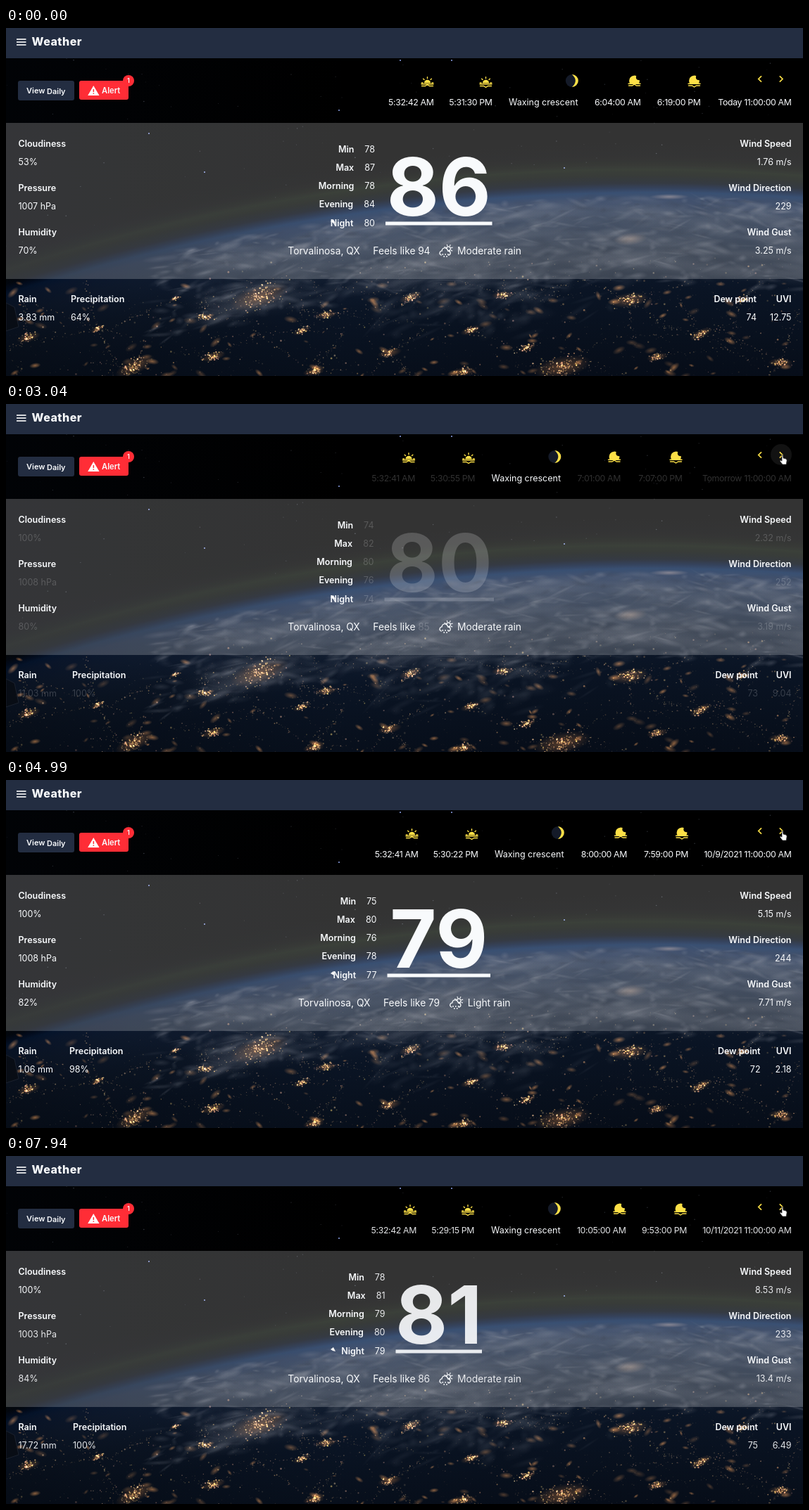
An HTML page with a canvas that plays this animation: 1132x495 px, repeating every 7.99 s.

```html
<!DOCTYPE html>
<html lang="en">
<head>
<meta charset="utf-8">
<title>Weather</title>
<style>
html, body { margin: 0; width: 100%; height: 100%; overflow: hidden; background: #000; }
canvas { display: block; width: 1132px; height: 495px; }
</style>
</head>
<body>
<canvas id="stage" width="1132" height="495"></canvas>
<script>
const W = 1132, H = 495, LOOP = 7990, FADE = 285;
const NAVY = '#232d41', RED = '#ff2d36', YELLOW = '#fde047', WHITE = '#f8fafc';
const ctx = document.getElementById('stage').getContext('2d');

// ends: right edges of the header columns; bar: underline of the big number
const days = [
  { times: ['5:32:42 AM', '5:31:30 PM', 'Waxing crescent', '6:04:00 AM', '6:19:00 PM', 'Today 11:00:00 AM'],
    ends: [607.5, 690.5, 812.5, 901.5, 986.5], left: ['53%', '1007 hPa', '70%'], right: ['1.76 m/s', '229', '3.25 m/s'],
    temps: ['78', '87', '78', '84', '80'], now: '86', bar: [539, 690.5], feels: '94', sky: 'Moderate rain',
    rain: '3.83 mm', chance: '64%', chanceX: 92, dew: '74', dewX: 1066, uvi: '12.75' },
  { times: ['5:32:41 AM', '5:30:55 PM', 'Waxing crescent', '7:01:00 AM', '7:07:00 PM', 'Tomorrow 11:00:00 AM'],
    ends: [581, 666, 788, 873, 960.5], left: ['100%', '1008 hPa', '80%'], right: ['2.32 m/s', '252', '3.19 m/s'],
    temps: ['74', '82', '80', '76', '74'], now: '80', bar: [537.5, 693], feels: '85', sky: 'Moderate rain',
    rain: '11.03 mm', chance: '100%', chanceX: 94, dew: '73', dewX: 1068, uvi: '9.04' },
  { times: ['5:32:41 AM', '5:30:22 PM', 'Waxing crescent', '8:00:00 AM', '7:59:00 PM', '10/9/2021 11:00:00 AM'],
    ends: [585.5, 670.5, 792.5, 882, 969], left: ['100%', '1008 hPa', '82%'], right: ['5.15 m/s', '244', '7.71 m/s'],
    temps: ['75', '80', '76', '78', '77'], now: '79', bar: [541.5, 688], feels: '79', sky: 'Light rain',
    rain: '1.06 mm', chance: '98%', chanceX: 90, dew: '72', dewX: 1071.5, uvi: '2.18' },
  { times: ['5:32:41 AM', '5:29:48 PM', 'Waxing crescent', '9:02:00 AM', '8:54:00 PM', '10/10/2021 11:00:00 AM'],
    ends: [578.5, 665, 787.5, 875.5, 964], left: ['100%', '1006 hPa', '90%'], right: ['7.94 m/s', '230', '12.31 m/s'],
    temps: ['77', '79', '78', '79', '79'], now: '77', bar: [542, 687], feels: '79', sky: 'Light rain',
    rain: '3.12 mm', chance: '96%', chanceX: 88.5, dew: '74', dewX: 1068, uvi: '5.04' },
  { times: ['5:32:42 AM', '5:29:15 PM', 'Waxing crescent', '10:05:00 AM', '9:53:00 PM', '10/11/2021 11:00:00 AM'],
    ends: [583, 665, 787.5, 880.5, 967], left: ['100%', '1003 hPa', '84%'], right: ['8.53 m/s', '233', '13.4 m/s'],
    temps: ['78', '81', '79', '80', '79'], now: '81', bar: [553.5, 676], feels: '86', sky: 'Moderate rain',
    rain: '17.72 mm', chance: '100%', chanceX: 95, dew: '75', dewX: 1068, uvi: '6.49' }
];
const clicks = [
  { press: 2700, swap: 2985, calm: 3380 },
  { press: 4310, swap: 4705, calm: 4990 },
  { press: 5870, swap: 6175, calm: 6470 },
  { press: 7440, swap: 7680, calm: 7540 }
];

const clamp = v => Math.max(0, Math.min(1, v));
const mix = (a, b, c, u) => a * (1 - u) ** 2 + 2 * b * u * (1 - u) + c * u * u;

let seed = 7;
const rnd = () => (seed = (seed * 16807) % 2147483647) / 2147483647;
const spread = () => rnd() + rnd() + rnd() - 1.5;

function text(s, x, y, { size = 12.5, weight = 400, align = 'left', gap = 0, color = WHITE, alpha = 1 } = {}) {
  ctx.font = `${weight} ${size}px Inter, "Open Sans", sans-serif`;
  ctx.letterSpacing = gap + 'px';
  ctx.textAlign = align;
  ctx.fillStyle = color;
  ctx.globalAlpha = alpha;
  ctx.fillText(s, x, y);
  ctx.globalAlpha = 1;
  return ctx.measureText(s).width;
}

function shape(points, fill, stroke, width = 1, c = ctx) {
  c.beginPath();
  points.forEach(([x, y]) => c.lineTo(x, y));
  if (fill) { c.closePath(); c.fillStyle = fill; c.fill(); }
  if (stroke) { c.strokeStyle = stroke; c.lineWidth = width; c.stroke(); }
}

function disc(x, y, r, fill, c = ctx) {
  c.beginPath();
  c.arc(x, y, r, 0, Math.PI * 2);
  c.fillStyle = fill;
  c.fill();
}

function box(x, y, w, h, r, fill) {
  ctx.beginPath();
  ctx.roundRect(x, y, w, h, r);
  ctx.fillStyle = fill;
  ctx.fill();
}

// ---- night-time planet ----
const limbY = x => 3242 - Math.sqrt(3011 ** 2 - (x - 920) ** 2);

function ring(c, cx, cy, from, to, stops) {
  const g = c.createRadialGradient(cx, cy, from, cx, cy, to);
  stops.forEach(([r, color]) => g.addColorStop((r - from) / (to - from), color));
  c.fillStyle = g;
  c.fillRect(0, 0, W, H);
}

function blob(c, x, y, rx, ry, tilt, rgb, alpha) {
  c.save();
  c.translate(x, y);
  c.rotate(tilt);
  c.scale(rx, ry);
  const g = c.createRadialGradient(0, 0, 0, 0, 0, 1);
  g.addColorStop(0, `rgba(${rgb},${alpha})`);
  g.addColorStop(1, `rgba(${rgb},0)`);
  disc(0, 0, 1, g, c);
  c.restore();
}

function drawClouds(c) {
  const tilt = x => (x - 920) / 3011;
  for (let i = 0; i < 200; i++) {
    const x = 300 + rnd() * 900, depth = 22 + rnd() * 95;
    blob(c, x, limbY(x) + depth, 30 + rnd() * 60, 6 + rnd() * 13, tilt(x), '118,122,134', 0.05 + rnd() * 0.07);
  }
  // fine mottling, light and dark
  for (let i = 0; i < 1100; i++) {
    const x = 210 + rnd() * 950, depth = 10 + rnd() ** 1.2 * 125;
    const tone = rnd() < 0.6 ? '150,153,163' : '10,18,34';
    blob(c, x, limbY(x) + depth, 4 + rnd() * 24, 1.5 + rnd() * 5, tilt(x) + spread() * 0.5, tone, 0.06 + rnd() * 0.16);
  }
  for (let i = 0; i < 190; i++) {
    blob(c, 650 + spread() * 190, 380 + spread() * 50, 5 + rnd() * 28, 2 + rnd() * 9, -0.4 + spread() * 0.5, '112,118,130', 0.1);
  }
}

function drawLights(c) {
  const cities = [
    [360, 382, 20], [885, 387, 13], [790, 482, 19], [183, 481, 14], [575, 383, 8], [705, 380, 7],
    [455, 408, 7], [295, 467, 8], [545, 462, 8], [420, 431, 6], [660, 430, 7], [740, 455, 6],
    [987, 435, 8], [1045, 386, 6], [32, 440, 8], [282, 411, 6], [130, 428, 5], [650, 489, 8],
    [437, 489, 7], [1100, 476, 8], [925, 468, 7], [240, 385, 4]
  ];
  const light = (x, y, r, a) => disc(x, y, r, `rgba(255,${165 + rnd() * 50 | 0},${85 + rnd() * 60 | 0},${a})`, c);
  c.globalCompositeOperation = 'lighter';
  blob(c, 942, 240, 28, 4, 0, '255,185,120', 0.35);
  blob(c, 887, 300, 24, 9, -0.1, '255,185,120', 0.3);
  cities.forEach(([x, y, s]) => {
    const lean = -0.25 + spread() * 0.3;
    blob(c, x, y, s * 2.2, s * 0.8, lean, '255,150,60', 0.32);
    for (let i = 0; i < s * 6; i++) {
      const d = spread() * s * (0.6 + rnd() * 2), e = spread() * s * 0.8;
      const r = 0.4 + rnd() * 0.8;
      light(x + d, y + d * lean + e, r, 0.2 + rnd() * 0.55);
    }
  });
  // faint towns strung along roads between the cities
  for (let i = 0; i < 75; i++) {
    const [ax, ay] = cities[rnd() * cities.length | 0], reach = 40 + rnd() * 110, turn = rnd() * 6.28;
    for (let d = 0; d < reach; d += 2 + rnd() * 5) {
      const x = ax + Math.cos(turn) * d + spread() * 4, y = ay + Math.sin(turn) * d * 0.5 + spread() * 3;
      if (y > 358) light(x, y, 0.3 + rnd() * 0.6, 0.08 + rnd() * 0.36);
    }
  }
  for (let i = 0; i < 130; i++) {
    const x = rnd() * W, y = 362 + rnd() * 133, s = 2 + rnd() * 5;
    blob(c, x, y, s * 1.5, s * 0.7, spread(), '255,160,75', 0.2 + rnd() * 0.35);
  }
  for (let i = 0; i < 1100; i++) {
    const x = rnd() * W, y = 325 + rnd() * 170;
    if (y > limbY(x) + 45) light(x, y, 0.3 + rnd() ** 4 * 1.1, 0.1 + rnd() * 0.35);
  }
  c.globalCompositeOperation = 'source-over';
}

function makePlanet() {
  const layer = document.createElement('canvas');
  layer.width = W;
  layer.height = H;
  const c = layer.getContext('2d');
  ring(c, 920, 3242, 2700, 3080, [
    [2700, '#050a14'], [2800, '#08101d'], [2870, '#0a1424'], [2925, '#0f1b2e'], [2975, '#152540'],
    [2999, '#12264a'], [3008, '#08244f'], [3014, '#031434'], [3021, '#020916'], [3036, '#020304'], [3080, '#000000']
  ]);
  ring(c, 900, 3103, 2880, 2922, [
    [2880, 'rgba(10,17,8,0)'], [2891, 'rgba(10,17,8,.4)'], [2902, 'rgba(11,18,9,.9)'],
    [2909, 'rgba(9,13,6,.5)'], [2922, 'rgba(6,8,5,0)']
  ]);
  const shade = c.createLinearGradient(0, 0, 480, 0);
  shade.addColorStop(0, 'rgba(2,5,10,.6)');
  shade.addColorStop(1, 'rgba(2,5,10,0)');
  c.fillStyle = shade;
  c.fillRect(0, 0, W, H);

  for (let i = 0; i < 150; i++) {
    const x = rnd() * W, y = 43 + rnd() * 290;
    if (y < limbY(x) - 35) disc(x, y, 0.4 + rnd() * 0.4, `rgba(180,190,215,${0.1 + rnd() * 0.3})`, c);
  }
  [[560, 46], [633, 46], [473, 117], [203, 150], [282, 205], [793, 199]]
    .forEach(([x, y]) => disc(x, y, 1, '#8fa5ee', c));

  drawClouds(c);
  drawLights(c);
  shape([[0, 391], [12, 397], [18, 425], [0, 431]], 'rgba(9,12,19,.8)', '#1b212d', 1, c);
  c.fillStyle = 'rgba(255,255,255,.2)';
  c.fillRect(0, 135, W, 222);
  shape([[461, 275], [465, 272], [468, 278], [464, 277]], '#f4f4f4', null, 1, c);
  return layer;
}
const planet = makePlanet();

// ---- icons ----
function horizon(x, y, dir) {
  shape([[x - 8.5, y + 4.3], [x + 8.5, y + 4.3]], null, YELLOW, 1.4);
  shape([[x - 8, y + 7], [x - 3, y + 7], [x, y + 7 - dir * 2], [x + 3, y + 7], [x + 8, y + 7]], null, YELLOW, 1.4);
}

function sunIcon(x, y, dir) {
  ctx.lineCap = 'round';
  ctx.beginPath();
  ctx.arc(x, y + 3, 4.7, Math.PI, 0);
  ctx.fillStyle = YELLOW;
  ctx.fill();
  for (let i = 0; i < 5; i++) {
    const a = Math.PI * (1 + i / 4), cx = Math.cos(a), sy = Math.sin(a);
    shape([[x + cx * 6.3, y + 2.5 + sy * 6.3], [x + cx * 8.3, y + 2.5 + sy * 8.3]], null, YELLOW, 1.4);
  }
  horizon(x, y, dir);
}

function moonIcon(x, y, dir) {
  ctx.save();
  ctx.beginPath();
  ctx.rect(x - 10, y - 10, 20, 14);
  ctx.clip();
  ctx.beginPath();
  ctx.arc(x, y, 7.4, -0.1, Math.PI * 1.62);
  ctx.quadraticCurveTo(x + 1, y - 1, x + 7.3, y - 0.7);
  ctx.fillStyle = YELLOW;
  ctx.fill();
  ctx.restore();
  horizon(x, y, dir);
}

function crescentIcon(x, y) {
  disc(x, y, 9, '#141a28');
  ctx.beginPath();
  ctx.arc(x, y, 9, -Math.PI / 2, Math.PI / 2);
  ctx.quadraticCurveTo(x + 10, y, x, y - 9);
  ctx.fillStyle = YELLOW;
  ctx.fill();
}

function rainIcon(x, y) {
  ctx.strokeStyle = WHITE;
  ctx.lineWidth = 1.3;
  ctx.beginPath();
  ctx.arc(x - 5, y + 3, 3.2, Math.PI * 0.6, Math.PI * 1.5);
  ctx.arc(x - 1, y, 4.2, Math.PI * 1.05, Math.PI * 1.95);
  ctx.arc(x + 4, y + 3.2, 2.9, Math.PI * 1.45, Math.PI * 0.5);
  ctx.stroke();
  ctx.beginPath();
  ctx.arc(x + 4, y - 3, 3, Math.PI * 1.05, Math.PI * 0.45);
  ctx.stroke();
  for (let i = 0; i < 5; i++) {
    const a = -2.7 + i * 0.8, cx = Math.cos(a), sy = Math.sin(a);
    shape([[x + 4 + cx * 4.6, y - 3 + sy * 4.6], [x + 4 + cx * 6, y - 3 + sy * 6]], null, WHITE, 1.2);
  }
  for (let i = 0; i < 5; i++) disc(x - 4 + i * 1.9, y + (i % 2 ? 8 : 5), 0.9, WHITE);
}

// ---- pointer ----
function arrow(x, y) {
  const p = [[0, 0], [0, 10.5], [2.4, 8.4], [4, 12], [5.8, 11.2], [4.2, 7.7], [7.3, 7.5]];
  shape(p.map(([a, b]) => [x + a, y + b]), '#fff', '#222', 0.6);
}

function hand(x, y) {
  const p = [[0, 0.6], [1.6, 0.6], [2, 5], [6, 6], [7.2, 8], [6.2, 14], [1, 14], [-2.8, 9.2], [-2, 7.8], [0, 9.2]];
  ctx.lineJoin = 'round';
  shape(p.map(([a, b]) => [x + a, y + b]), '#fff', '#222', 0.7);
}

function pointer(t) {
  if (t < 520) return;
  if (t < 1530) {
    const u = 1 - (1 - clamp((t - 500) / 700)) ** 3;
    return arrow(mix(952, 1230, 1072, u), mix(495, 380, 209, u));
  }
  const u = 1 - (1 - clamp((t - 1530) / 690)) ** 4;
  const x = mix(1072, 1097, 1102, u), y = mix(209, 140.5, 72, u);
  (y < 88 ? hand : arrow)(x, y);
}

// ---- page ----
function frame() {
  ctx.fillStyle = NAVY;
  ctx.fillRect(0, 0, W, 43);
  ctx.lineCap = 'butt';
  [16, 20, 24].forEach(y => shape([[15, y], [28.5, y]], null, '#fff', 1.6));
  text('Weather', 36.5, 24.5, { size: 16, weight: 800, gap: 0.5 });

  box(17, 75, 80, 28, 3, NAVY);
  text('View', 29, 93, { size: 11, weight: 600 });
  text('Daily', 58, 94, { size: 11, weight: 600 });
  box(104, 75, 70, 27, 3, RED);
  shape([[124.3, 82], [132.5, 96], [116.2, 96]], '#fff');
  ctx.fillStyle = RED;
  ctx.fillRect(123.6, 87, 1.5, 4);
  ctx.fillRect(123.6, 92.4, 1.5, 1.5);
  text('Alert', 136, 93, { size: 11.2, weight: 600 });
  disc(174, 75, 8, RED);
  text('1', 174, 78.3, { size: 9, weight: 600, align: 'center' });
}

function nav(t) {
  clicks.forEach(({ press, calm }) => {
    if (t < press || t >= calm) return;
    const glow = 0.07 * clamp((t - press - 20) / 60) * clamp((calm - t) / 100);
    disc(1101, 72, 15, `rgba(255,255,255,${glow})`);
  });
  ctx.lineCap = 'butt';
  ctx.lineJoin = 'miter';
  shape([[1073, 68.4], [1068.8, 72.5], [1073, 76.6]], null, YELLOW, 1.7);
  shape([[1098.8, 68.4], [1103, 72.5], [1098.8, 76.6]], null, YELLOW, 1.7);
  if (clicks.some(({ press }) => t >= press && t < press + 90)) disc(1101.8, 73, 9, 'rgba(255,240,0,.44)');
}

function report(t) {
  const n = clicks.filter(c => t >= c.swap).length;
  const day = days[n], last = days[n - 1];
  const fade = n ? clamp((t - clicks[n - 1].swap) / FADE) : 1;
  // only values that differ from the previous day fade in
  const shown = (now, old) => (last && now !== old ? fade : 1);
  const was = (key, i) => last && (i === undefined ? last[key] : last[key][i]);
  const label = (s, x, y, align) => text(s, x, y, { weight: 600, align });
  const value = (s, old, x, y, align) => text(s, x, y, { align, alpha: shown(s, old) });

  day.times.forEach((s, i) => {
    const end = day.ends[i] || 1115.5, word = i === 2;
    text(s, end, 110, { size: word ? 12.5 : 12.3, gap: word ? 0 : -0.35, align: 'right', alpha: shown(s, was('times', i)) });
    if (i < 2) sunIcon(end - 9, 75.5, i ? -1 : 1);
    else if (word) crescentIcon(end - 8.7, 75);
    else if (i < 5) moonIcon(end - 9, 75, i === 3 ? 1 : -1);
  });

  ['Cloudiness', 'Pressure', 'Humidity'].forEach((s, i) => {
    label(s, 17.5, 169 + i * 63, 'left');
    value(day.left[i], was('left', i), 17.5, 195.3 + i * 63, 'left');
  });
  ['Wind Speed', 'Wind Direction', 'Wind Gust'].forEach((s, i) => {
    label(s, 1115.5, 169 + i * 63, 'right');
    value(day.right[i], was('right', i), 1115.5, 195.3 + i * 63, 'right');
  });

  const [from, to] = day.bar;
  ['Min', 'Max', 'Morning', 'Evening', 'Night'].forEach((s, i) => {
    const y = 176.5 + i * 26.25;
    const w = value(day.temps[i], was('temps', i), from - 15, y, 'right');
    label(s, from - 30 - w, y, 'right');
  });
  const alpha = shown(day.now, was('now'));
  text(day.now, (from + to) / 2, 267, { size: 114, weight: 700, align: 'center', alpha });
  ctx.globalAlpha = alpha;
  ctx.fillRect(from, 275.5, to - from, 5);
  ctx.globalAlpha = 1;

  const x = day.sky === 'Light rain' ? 415 : 400.3, y = 321.7, size = 13.8;
  text('Torvalinosa, QX', x, y, { size });
  const w = text('Feels like ', x + 121, y, { size });
  text(day.feels, x + 121 + w, y, { size, gap: -0.3, alpha: shown(day.feels, was('feels')) });
  rainIcon(x + 224, 317);
  text(day.sky, x + 240.8, y, { size, alpha: shown(day.sky, was('sky')) });

  label('Rain', 17.5, 390, 'left');
  value(day.rain, was('rain'), 17.5, 416.3, 'left');
  label('Precipitation', day.chanceX, 390, 'left');
  value(day.chance, was('chance'), day.chanceX, 416.3, 'left');
  label('Dew point', day.dewX, 390, 'right');
  value(day.dew, was('dew'), day.dewX, 416.3, 'right');
  label('UVI', 1115.5, 390, 'right');
  value(day.uvi, was('uvi'), 1115.5, 416.3, 'right');
}

let start;
function tick(now) {
  start ??= now;
  const t = (now - start) % LOOP;
  ctx.drawImage(planet, 0, 0);
  frame();
  report(t);
  nav(t);
  pointer(t);
  requestAnimationFrame(tick);
}
requestAnimationFrame(tick);
</script>
</body>
</html>
```
